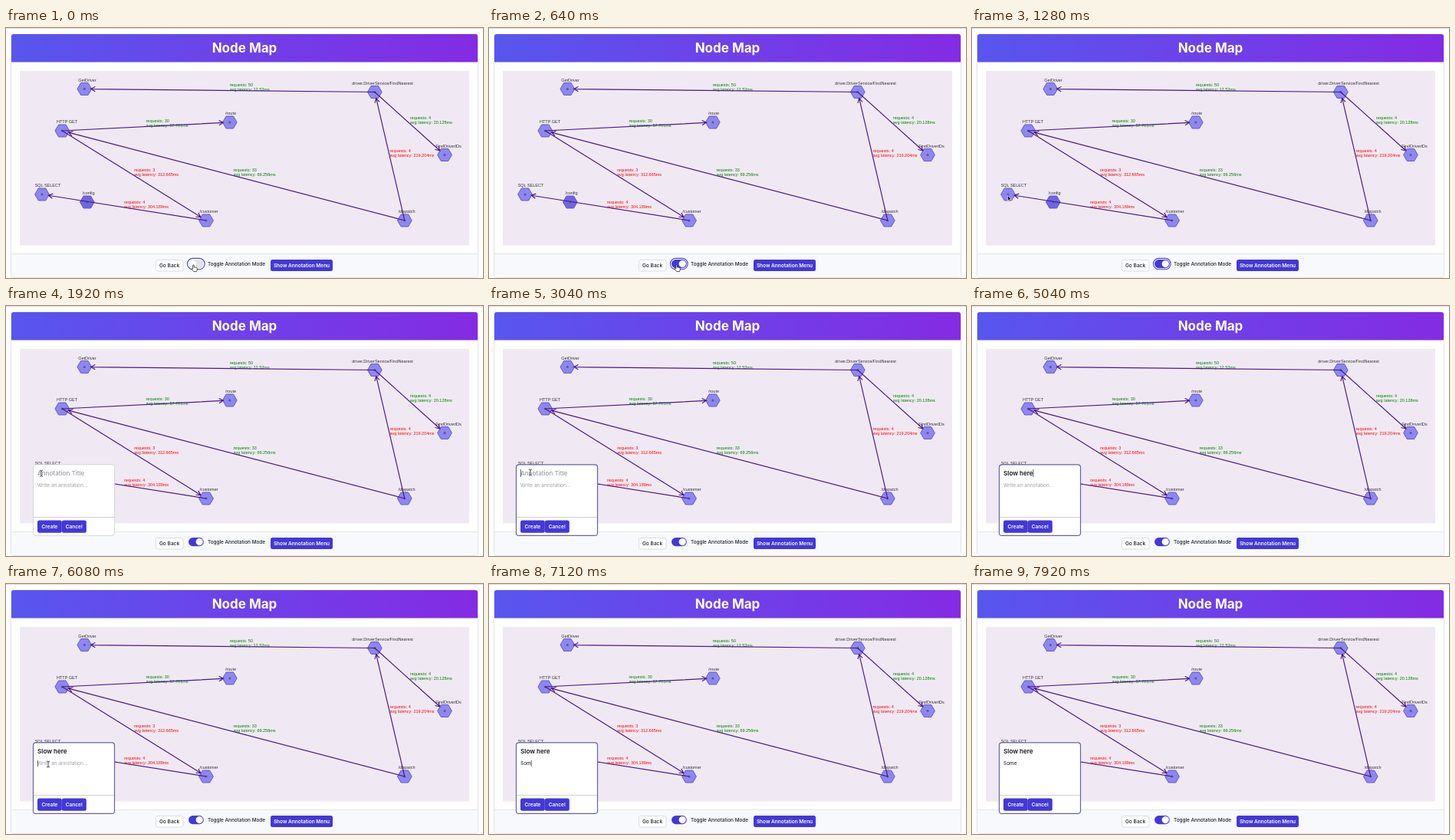
Recreate the animation shown at these times as an HTML page. Size 622 by 326 pixels, loop 8 s.

```html
<!DOCTYPE html>
<html lang="en">
<head>
<meta charset="utf-8">
<title>Node Map</title>
<style>
  html, body { margin: 0; width: 100%; height: 100%; overflow: hidden; background: #fff; }
  svg { display: block; width: 100vw; height: 100vh; }
  text { font-family: Inter, "Open Sans", sans-serif; white-space: pre; }
  .graph text { font: 5.5px "Liberation Sans", Arial, sans-serif; }
</style>
</head>
<body>
<svg viewBox="0 0 622 326" preserveAspectRatio="none">
  <defs>
    <linearGradient id="head">
      <stop offset="0" stop-color="#5856ee"/>
      <stop offset="1" stop-color="#842be4"/>
    </linearGradient>
  </defs>
  <rect width="622" height="326" fill="#fff"/>
  <rect width="622" height="1" fill="#dcdbe1"/>
  <rect x="6.5" y="8" width="609" height="317.5" rx="3" fill="#fff" stroke="#e3e3ea"/>
  <path d="M7 44.5V11a3 3 0 0 1 3-3H612a3 3 0 0 1 3 3V44.5Z" fill="url(#head)"/>
  <text x="311" y="32.3" font-size="17" font-weight="700" fill="#fff" text-anchor="middle">Node Map</text>
  <rect x="18" y="56" width="586" height="227.5" fill="#f0e9f3"/>
  <path d="M7 294.5H615V322a3 3 0 0 1-3 3H10a3 3 0 0 1-3-3Z" fill="#f8f9fc"/>
  <path d="M7 294.5H615" stroke="#e2e4ea"/>
  <g class="graph" id="graph"></g>

  <rect x="195.5" y="302.5" width="35.5" height="14.5" rx="2.5" fill="#fff" stroke="#d3d5dc" stroke-width=".8"/>
  <text x="213" y="312" font-size="6.6" font-weight="500" fill="#1b1f2b" text-anchor="middle">Go Back</text>
  <rect id="ring" x="236.4" y="300.4" width="22.8" height="14.4" rx="7.2" fill="#fff" stroke="#4f46c8" stroke-width="1.1"/>
  <rect id="pill" x="238" y="302" width="19.8" height="11.2" rx="5.6"/>
  <circle id="knob" cy="307.6" r="4.6" fill="#fff"/>
  <text x="263" y="310" font-size="6.4" font-weight="500" fill="#1b1f2b">Toggle Annotation Mode</text>
  <rect x="345" y="302" width="81" height="15" rx="2.5" fill="#4338d8"/>
  <text x="385.5" y="312" font-size="6.5" font-weight="600" fill="#fff" text-anchor="middle">Show Annotation Menu</text>

  <g id="dialog">
    <rect id="frame" x="35.5" y="206.8" width="106" height="92.6" rx="3.5" fill="#fff"/>
    <text id="title" x="41" y="221" font-size="8.1"></text>
    <text id="note" x="41" y="236" font-size="6.5"></text>
    <path d="M36 275.5H141" stroke="#c4c5ca" stroke-width=".8"/>
    <rect x="41" y="279.5" width="31.8" height="16.3" rx="2.5" fill="#4338d8"/>
    <rect x="72.8" y="279.5" width="32" height="16.3" rx="2.5" fill="#4338d8"/>
    <g font-size="6.5" font-weight="600" fill="#fff" text-anchor="middle">
      <text x="57" y="290">Create</text>
      <text x="88.7" y="290">Cancel</text>
    </g>
    <rect id="caret" width=".7" fill="#222"/>
  </g>

  <g id="hand" stroke="#111" stroke-width=".7" stroke-linejoin="round" fill="#fff">
    <path d="M-.8 .2q.8-.9 1.5 0V3q1-.6 1.5.3 1-.5 1.4.4 1.2-.4 1.2.8V6.3L3.9 8.6H.2L-2.5 5.2q.1-1.2 1.7-.1Z"/>
  </g>
  <path id="arrow" d="M0 0V7L1.6 5.6 2.7 8 3.9 7.5 2.8 5.2H5Z" fill="#111" stroke="#fff" stroke-width=".6"/>
  <g id="beam" fill="none" stroke-linecap="round">
    <path d="M-1.6-4Q0-4 0-3V3Q0 4-1.6 4M1.6-4Q0-4 0-3M0 3Q0 4 1.6 4" stroke="#fff" stroke-width="1.6"/>
    <path d="M-1.6-4Q0-4 0-3V3Q0 4-1.6 4M1.6-4Q0-4 0-3M0 3Q0 4 1.6 4" stroke="#222" stroke-width=".8"/>
  </g>
</svg>
<script>
const LOOP = 8000;
const $ = id => document.getElementById(id);

function add(parent, tag, attrs, text) {
  const el = document.createElementNS('http://www.w3.org/2000/svg', tag);
  set(el, attrs);
  if (text) el.textContent = text;
  return parent.appendChild(el);
}
function set(el, attrs) {
  for (const k in attrs) el.setAttribute(k, attrs[k]);
}
const show = (el, on) => el.setAttribute('visibility', on ? 'visible' : 'hidden');

// Graph
const nodes = {
  get: [102.3, 79.5, 'GetDriver', 106],
  near: [480.8, 83.5, 'driver.DriverService/FindNearest', 491],
  http: [73.3, 134, 'HTTP GET', 79.5],
  route: [291.8, 123, '/route', 293],
  ids: [572, 165.5, 'FindDriverIDs', 577],
  sql: [47, 217, 'SQL SELECT', 54.5],
  config: [105.8, 227, '/config', 107.5],
  customer: [261, 251, '/customer', 264.5],
  dispatch: [519.8, 251, '/dispatch', 522.5]
};
// from, to, label x, label y, requests, latency, colour
const edges = [
  ['near', 'get', 291.7, 76, 50, '12.52', 'green'],
  ['http', 'route', 182.5, 122.8, 30, '57.761', 'green'],
  ['http', 'customer', 167, 187, 3, '312.665', 'red'],
  ['customer', 'sql', 154, 229, 4, '304.189', 'red'],
  ['dispatch', 'http', 296.5, 187, 33, '69.256', 'green'],
  ['dispatch', 'near', 500.5, 162, 4, '219.204', 'red'],
  ['near', 'ids', 526.8, 119, 4, '20.128', 'green']
];

function drawGraph() {
  const g = $('graph');
  for (const [x, y, name, labelX] of Object.values(nodes))
    add(g, 'text', { x: labelX, y: y - 9.8, fill: '#333', 'text-anchor': 'middle' }, name);
  for (const [, , x, y, count, ms, fill] of edges) {
    add(g, 'text', { x, y, fill }, `requests: ${count}`);
    add(g, 'text', { x, y: y + 5.7, fill }, `avg latency: ${ms}ms`);
  }
  for (const [key, [x, y]] of Object.entries(nodes)) {
    const hex = [[-9.4, 0], [-4.7, -8], [4.7, -8], [9.4, 0], [4.7, 8], [-4.7, 8]]
      .map(([a, b]) => [x + a, y + b]).join(' ');
    add(g, 'polygon', {
      points: hex, stroke: '#5b50cf', 'stroke-width': .9,
      fill: key === 'config' ? '#6f67e2' : '#8e87ee'
    });
    add(g, 'circle', { cx: x, cy: y, r: 1.5, fill: '#5a4cc4' });
  }
  for (const [from, to] of edges) {
    const [x1, y1] = nodes[from], [x2, y2] = nodes[to];
    const angle = Math.atan2(y2 - y1, x2 - x1);
    const tipX = x2 - 8.3 * Math.cos(angle), tipY = y2 - 8.3 * Math.sin(angle);
    const barb = side => [tipX - 6.5 * Math.cos(angle + side), tipY - 6.5 * Math.sin(angle + side)];
    add(g, 'path', {
      d: `M${x1} ${y1}L${tipX} ${tipY}M${barb(.5)}L${tipX} ${tipY}L${barb(-.5)}`,
      fill: 'none', stroke: '#4b1786', 'stroke-width': 1.15
    });
  }
}

// Timeline
const OPEN = 1520, FOCUS = 2600, NOTE = 5750;
const titleKeys = [3480, 3740, 3950, 4300, 4440, 4580, 4720, 4840, 4960];
const noteKeys = [6850, 6990, 7120, 7280];
const path = [
  [0, 244.5, 309], [640, 244.5, 309], [1240, 46.5, 218.3], [1560, 46.5, 218.3],
  [1880, 46, 218.3], [2080, 46, 218.3], [2600, 54, 217], [5100, 54, 217],
  [5700, 55, 235], [LOOP, 55, 235]
];

const clamp = v => Math.max(0, Math.min(1, v));
const ease = v => v * v * (3 - 2 * v);
const typed = (text, keys, t) => text.slice(0, keys.filter(k => k <= t).length);

function pointer(t) {
  const i = Math.max(1, path.findIndex(p => p[0] > t));
  const [t0, x0, y0] = path[i - 1], [t1, x1, y1] = path[i];
  const k = ease(clamp((t - t0) / (t1 - t0)));
  return [x0 + (x1 - x0) * k, y0 + (y1 - y0) * k];
}

function field(el, value, hint, weight) {
  el.textContent = value || hint;
  set(el, { fill: value ? '#15171f' : '#9a9da6', 'font-weight': weight });
}

function draw(t) {
  const on = ease(clamp((t - 100) / 240));
  const mix = (a, b) => Math.round(a + (b - a) * on);
  set($('pill'), { fill: `rgb(${mix(226, 67)},${mix(227, 56)},${mix(234, 216)})` });
  set($('knob'), { cx: 243.6 + 8.6 * on });
  show($('ring'), t < OPEN);

  const open = t >= OPEN, focused = t >= FOCUS;
  $('dialog').style.display = open ? '' : 'none';
  if (open) {
    const title = typed('Slow here', titleKeys, t);
    const note = typed('Some', noteKeys, t);
    field($('title'), title, 'Annotation Title', title ? 600 : 500);
    field($('note'), note, 'Write an annotation...', 400);
    set($('frame'), { stroke: focused ? '#6664a0' : '#d0d1d8', 'stroke-width': focused ? 1.2 : .8 });

    const inNote = t >= NOTE;
    const last = Math.max(...[FOCUS, NOTE, ...titleKeys, ...noteKeys].filter(k => k <= t));
    const value = inNote ? note : title;
    const width = value ? $(inNote ? 'note' : 'title').getComputedTextLength() : 0;
    set($('caret'), { x: 41 + width, y: inNote ? 230 : 213, height: inNote ? 8 : 10 });
    $('caret').style.display = focused && (t - last) % 1000 < 500 ? '' : 'none';
  }

  const [x, y] = pointer(t);
  const typing = (t >= titleKeys[0] && t < 5100) || t >= noteKeys[0];
  const shape = typing ? '' : t < 760 ? 'hand' : t < 1640 ? 'arrow' : 'beam';
  for (const id of ['hand', 'arrow', 'beam']) {
    show($(id), id === shape);
    set($(id), { transform: `translate(${x} ${y})` });
  }
}

drawGraph();
const start = performance.now();
function tick() {
  draw((performance.now() - start) % LOOP);
  requestAnimationFrame(tick);
}
tick();
</script>
</body>
</html>
```
